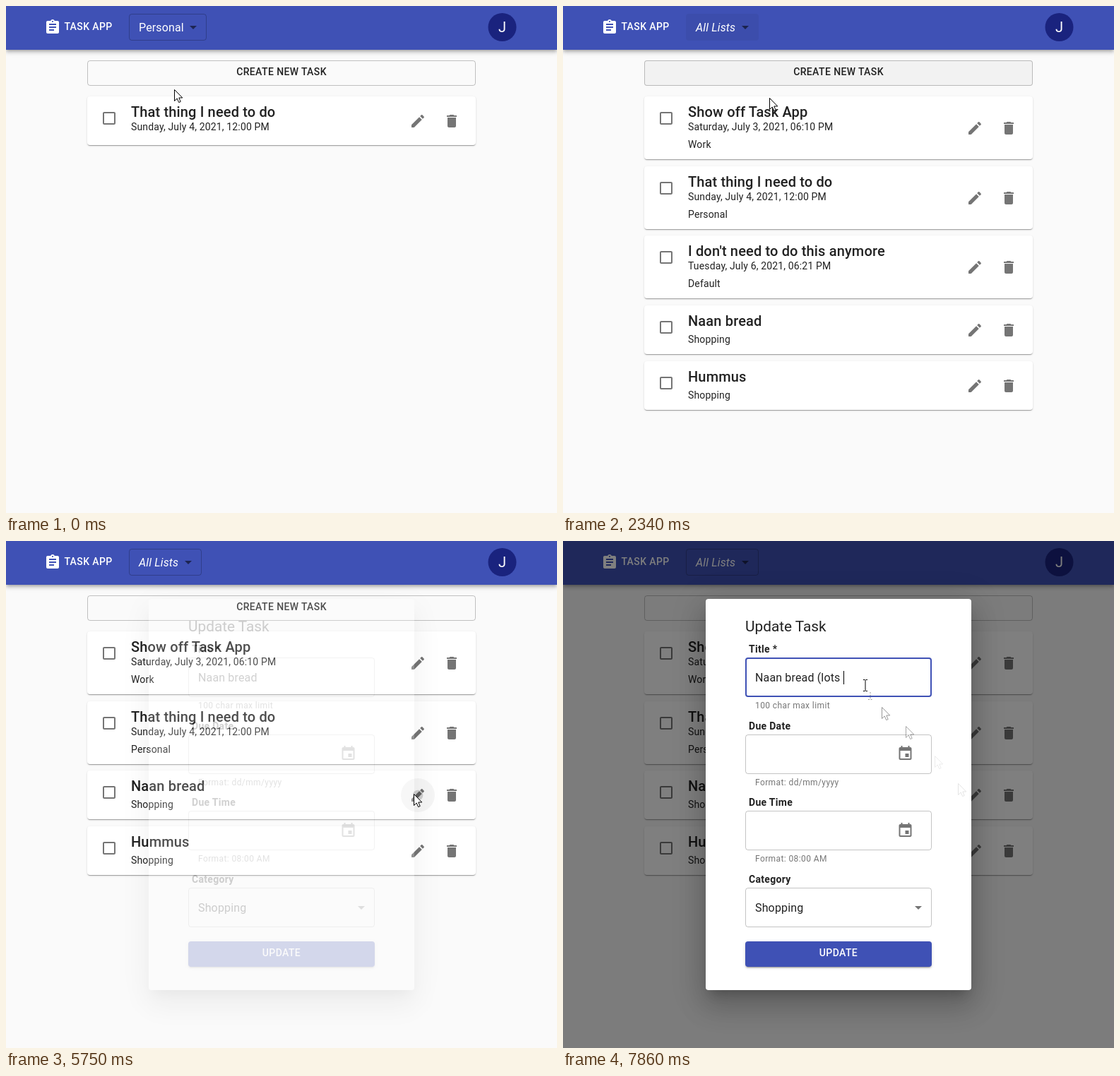
An HTML page for the animation above (8000 ms loop, 780x718 px).

```html
<!DOCTYPE html>
<html lang="en">
<head>
<meta charset="utf-8">
<title>Task list</title>
<style>
html, body { margin: 0; width: 100%; height: 100%; overflow: hidden; background: #fafafa; }
#stage { position: absolute; left: 0; top: 0; width: 780px; height: 718px; overflow: hidden; background: #fafafa; }
#stage div { position: absolute; box-sizing: border-box; }
svg { position: absolute; left: 0; top: 0; overflow: visible; }
#stage, text { font-family: Roboto, Arial, sans-serif; }
text { fill: rgba(0,0,0,.87); white-space: pre; }
.h6 { font-size: 20px; font-weight: 500; letter-spacing: .15px; }
.body1 { font-size: 16px; letter-spacing: .15px; }
.body2 { font-size: 14px; letter-spacing: .15px; }
.btn { font-size: 14px; font-weight: 500; letter-spacing: .4px; }
.label { font-size: 14px; font-weight: 700; letter-spacing: .3px; }
.help { font-size: 12px; letter-spacing: .4px; fill: rgba(0,0,0,.54); }
.head { font-size: 20.8px; }
.white { fill: #fff; }
.it { font-style: italic; }
.mid { text-anchor: middle; }
.icon { fill: rgba(0,0,0,.54); }
#bar { left: 0; top: 0; width: 780px; height: 62px; background: #3f51b5;
  box-shadow: 0 2px 4px -1px rgba(0,0,0,.2), 0 4px 5px rgba(0,0,0,.14), 0 1px 10px rgba(0,0,0,.12); }
#select { left: 174px; top: 11px; height: 38px; border: 1px solid; border-radius: 4px; }
#create { left: 115px; top: 77px; width: 550px; height: 36px; border: 1px solid rgba(0,0,0,.23); border-radius: 4px; }
.card { left: 115px; width: 550px; background: #fff; border-radius: 4px;
  box-shadow: 0 2px 1px -1px rgba(0,0,0,.2), 0 1px 1px rgba(0,0,0,.14), 0 1px 3px rgba(0,0,0,.12); }
#menu { left: 174px; top: 15px; width: 110px; height: 268px; background: #fff; border-radius: 4px; transform-origin: 0 0;
  box-shadow: 0 5px 5px -3px rgba(0,0,0,.2), 0 8px 10px 1px rgba(0,0,0,.14), 0 3px 14px 2px rgba(0,0,0,.12); }
#menu .item { left: 0; width: 110px; height: 36px; overflow: hidden; }
#shade { inset: 0; background: #000; }
#dialog { inset: 0; }
#paper { left: 202px; top: 82px; width: 376px; height: 554px; background: #fff; border-radius: 4px;
  box-shadow: 0 11px 15px -7px rgba(0,0,0,.2), 0 24px 38px 3px rgba(0,0,0,.14), 0 9px 46px 8px rgba(0,0,0,.12); }
.field { left: 258px; width: 264px; height: 56px; border: 1px solid rgba(0,0,0,.23); border-radius: 4px; }
#update { left: 258px; top: 567px; width: 264px; height: 36px; background: #3f51b5; border-radius: 4px;
  box-shadow: 0 3px 1px -2px rgba(0,0,0,.2), 0 2px 2px rgba(0,0,0,.14), 0 1px 5px rgba(0,0,0,.12); }
#value { left: 272px; top: 184px; font-size: 16px; line-height: 19px; letter-spacing: .15px; white-space: pre; color: rgba(0,0,0,.87); }
#caret { display: inline-block; width: 1px; height: 19px; background: #000; vertical-align: top; }
</style>
</head>
<body>
<div id="stage"></div>
<script>
const ICONS = {
  box: 'M19 5v14H5V5h14m0-2H5c-1.1 0-2 .9-2 2v14c0 1.1.9 2 2 2h14c1.1 0 2-.9 2-2V5c0-1.1-.9-2-2-2z',
  edit: 'M3 17.25V21h3.75L17.81 9.94l-3.75-3.75L3 17.25zM20.71 7.04c.39-.39.39-1.02 0-1.41l-2.34-2.34c-.39-.39-1.02-.39-1.41 0l-1.83 1.83 3.75 3.75 1.83-1.83z',
  bin: 'M6 19c0 1.1.9 2 2 2h8c1.1 0 2-.9 2-2V7H6v12zM19 4h-3.5l-1-1h-5l-1 1H5v2h14V4z',
  list: 'M19 3h-4.18C14.4 1.84 13.3 1 12 1c-1.3 0-2.4.84-2.82 2H5c-1.1 0-2 .9-2 2v14c0 1.1.9 2 2 2h14c1.1 0 2-.9 2-2V5c0-1.1-.9-2-2-2zm-7 0c.55 0 1 .45 1 1s-.45 1-1 1-1-.45-1-1 .45-1 1-1zm2 14H7v-2h7v2zm3-4H7v-2h10v2zm0-4H7V7h10v2z',
  day: 'M17 12h-5v5h5v-5zM16 1v2H8V1H6v2H5c-1.11 0-1.99.9-1.99 2L3 19c0 1.1.89 2 2 2h14c1.1 0 2-.9 2-2V5c0-1.1-.9-2-2-2h-1V1h-2zm3 18H5V8h14v11z',
  drop: 'M7 10l5 5 5-5z'
};
const POINTERS = {
  arrow: '<path d="M.5.5V16.5L4.2 13L6.7 18.6L9.2 17.5L6.8 12H11.8Z" fill="#fff" stroke="#000"/>',
  hand: '<g transform="translate(-6 0)" stroke="#000" fill="#fff"><path d="M6.5.5C5.5.5 5 1.3 5 2V12L3.2 10.4C2.2 9.6.8 10 .6 11C.4 11.6.8 12.2 1.2 12.8L5 18.5C5.4 19.2 5.5 20 5.5 22H14.5C14.5 19.5 16.5 17.5 16.5 14.5V9C16.5 7.5 14 7.3 14 8.8V8C14 6.6 11 6.4 11 8V7.3C11 6 8 5.8 8 7.3V2C8 1.2 7.5.5 6.5.5Z"/><path d="M8 7V11M11 8V11M14 9V11.5" fill="none"/></g>',
  beam: '<path d="M-3 -7.5H-.5M.5 -7.5H3M0 -7V8M-3 8.5H-.5M.5 8.5H3" fill="none" stroke="#000"/>'
};

const text = (x, y, cls, s) => `<text x="${x}" y="${y}" class="${cls}">${s}</text>`;
const icon = (cx, cy, name, cls = 'icon', id = '') =>
  `<path id="${id}" class="${cls}" transform="translate(${cx - 12} ${cy - 12})" d="${ICONS[name]}"/>`;
const svg = body => `<svg width="780" height="718">${body}</svg>`;
const ghost = (x, y, id) => `<g id="${id}" transform="translate(${x} ${y})">${POINTERS.arrow}</g>`;

const tasks = [
  { title: 'Show off Task App', date: 'Saturday, July 3, 2021, 06:10 PM', cat: 'Work' },
  { title: 'That thing I need to do', date: 'Sunday, July 4, 2021, 12:00 PM', cat: 'Personal' },
  { title: "I don't need to do this anymore", date: 'Tuesday, July 6, 2021, 06:21 PM', cat: 'Default' },
  { title: 'Naan bread', cat: 'Shopping' },
  { title: 'Hummus', cat: 'Shopping' }
];
const lists = ['All Lists', 'Default', 'Personal', 'Shopping', 'Wishlist', 'Work', 'Finished'];

const cardHtml = (k, i) => `<div class="card" id="card${i}">${svg(
  icon(31, 31, 'box') + text(62, 29, 'h6', k.title) +
  (k.date ? text(62, 48, 'body2', k.date) : '') +
  `<g id="cat${i}">${text(62, k.date ? 73 : 53, 'body2', k.cat)}</g>` +
  `<g id="acts${i}">${icon(468, 0, 'edit')}${icon(516, 0, 'bin')}</g>`)}</div>`;

const itemHtml = (s, i) => `<div class="item" style="top:${8 + 36 * i}px;background:rgba(0,0,0,${[.04, 0, .08][i] || 0})">${svg(
  (i ? '' : '<circle id="itemRipple" cx="54" cy="20"/>') +
  text(16, 24, 'body1' + (i % 6 ? '' : ' it'), s))}</div>`;

const fieldTops = [165, 274, 382, 491];
const labels = ['Title *', 'Due Date', 'Due Time', 'Category'];
const helps = ['100 char max limit', 'Format: dd/mm/yyyy', 'Format: 08:00 AM'];

document.getElementById('stage').innerHTML =
  `<div id="create"></div>${svg(text(390, 98, 'btn mid', 'CREATE NEW TASK'))}` +
  tasks.map(cardHtml).join('') +
  svg('<circle id="editHover" cx="583" r="24"/><circle id="binHover" cx="631" r="24"/><circle id="editRipple" cx="583"/><circle id="binRipple" cx="631"/>') +
  `<div id="bar"></div><div id="select"></div>` +
  svg(icon(66, 30, 'list', 'white') + text(82.5, 34, 'btn white', 'TASK APP') +
    text(188, 36, 'body1 white', '<tspan id="choice"></tspan>') + icon(0, 30, 'drop', 'icon', 'selectArrow') +
    '<circle cx="702.5" cy="30" r="20" fill="#1a237e"/>' +
    '<text x="702.5" y="37" class="mid white" font-size="20">J</text>') +
  `<div id="menu">${lists.map(itemHtml).join('')}</div>` +
  `<div id="shade"></div><div id="dialog"><div id="paper"></div>` +
  fieldTops.map((y, i) => `<div class="field" id="field${i}" style="top:${y}px"></div>`).join('') +
  '<div id="update"></div>' +
  svg(text(258, 128, 'head', 'Update Task') +
    labels.map((s, i) => text(263, fieldTops[i] - 7, 'label', s)).join('') +
    helps.map((s, i) => text(272, fieldTops[i] + 72, 'help', s)).join('') +
    icon(484.5, 301, 'day') + icon(484.5, 410, 'day') +
    text(272, 525, 'body1', 'Shopping') + icon(503, 519, 'drop') +
    text(390, 588, 'btn mid white', 'UPDATE')) +
  '<div id="value"><span id="typed"></span><span id="caret"></span></div></div>' +
  svg(ghost(559, 343, 'ghost0') + ghost(526, 304, 'ghost1') + ghost(485, 262, 'ghost2') + ghost(451, 235, 'ghost3') +
    '<path id="ghost4" d="M435 214V224M432 224.5H438" stroke="#000" stroke-dasharray="2 1.5"/>' +
    '<g id="pointer">' + Object.keys(POINTERS).map(k => `<g id="${k}">${POINTERS[k]}</g>`).join('') + '</g>');

const el = {};
document.querySelectorAll('[id]').forEach(e => { if (e.id) el[e.id] = e; });

// Time of each step, then its value
const path = [
  [30, 238, 118], [380, 230, 34], [940, 230, 34], [1140, 228, 40], [2080, 228, 40], [2840, 461, 370],
  [2900, 461, 370], [3240, 605, 378], [3500, 630, 376], [3650, 630, 376], [3680, 631, 374],
  [4420, 631, 374], [4580, 602, 361], [4750, 572, 359], [4850, 572, 359], [4880, 569, 358],
  [5060, 569, 358], [5120, 578, 359], [5700, 578, 359], [5860, 575, 357], [5950, 575, 357],
  [5980, 559, 343], [6015, 526, 304], [6050, 485, 262], [6080, 451, 235], [6110, 435, 216],
  [6140, 435, 216], [6210, 428, 204]
];
const shapes = [[0, 'arrow'], [82, 'hand'], [202, 'arrow'], [280, 'hand'], [2150, 'arrow'], [2237, 'hand'],
  [2308, 'arrow'], [3120, 'hand'], [5700, 'arrow'], [6105, 'beam']];
const typing = [[0, ''], [6840, ' '], [7140, ' ('], [7420, ' (l'], [7530, ' (lo'], [7640, ' (lot'], [7750, ' (lots'], [7860, ' (lots ']];
const ghosts = [[6010, .1], [6040, .07], [6075, .34], [6105, .4], [6150, .4]];

const LOOP = 8000, SHOW_ALL = 1560, REMOVED = 4445;
const at = (steps, t) => steps.filter(s => s[0] <= t).pop()[1];
const clamp = x => Math.min(1, Math.max(0, x));

// cubic-bezier(.4, 0, .2, 1)
function ease(x) {
  let lo = 0, hi = 1;
  for (let i = 0; i < 16; i++) {
    const u = (lo + hi) / 2, v = 1 - u;
    if (1.2 * v * v * u + .6 * v * u * u + u * u * u < x) lo = u; else hi = u;
  }
  return lo * lo * (3 - 2 * lo);
}
const ramp = (t, start, dur) => ease(clamp((t - start) / dur));
const hover = (t, ...spans) => Math.max(...spans.map(([a, b]) => ramp(t, a, 150) * (1 - ramp(t, b, 150))));

function pointerAt(t) {
  if (t <= path[0][0]) return path[0].slice(1);
  for (let i = 1; i < path.length; i++) {
    const [a, ax, ay] = path[i - 1], [b, bx, by] = path[i];
    if (t < b) {
      let k = (t - a) / (b - a);
      if (b - a > 345) k = k * k * (3 - 2 * k);
      return [ax + (bx - ax) * k, ay + (by - ay) * k];
    }
  }
  return path[path.length - 1].slice(1);
}

function ripple(node, t, start, end, size, alpha) {
  node.setAttribute('r', size * ramp(t, start, 420));
  node.style.opacity = t < start ? 0 : alpha * (1 - ramp(t, end, 250));
}

function drawCards(t) {
  const all = t >= SHOW_ALL;
  let y = 128.2;
  tasks.forEach((k, i) => {
    const gone = i === 2 && t >= REMOVED;
    const shown = i === 1 || (all && !gone);
    const h = k.date && all ? 89 : 69;
    const card = el['card' + i];
    card.style.display = shown ? 'block' : 'none';
    if (!shown) return;
    card.style.top = Math.round(y) + 'px';
    card.style.height = h + 'px';
    card.style.opacity = i === 1 ? 1 : ramp(t, SHOW_ALL, 225) * (i === 2 ? 1 - ramp(t, 4250, 195) : 1);
    el['cat' + i].style.display = all ? '' : 'none';
    el['acts' + i].setAttribute('transform', `translate(0 ${h / 2 + .5})`);
    y += h + 9.6;
  });
}

function drawSelect(t) {
  const allLists = t >= 1515, width = allLists ? 103 : 110;
  const focus = t >= 640 && t < 4060;
  el.choice.textContent = allLists ? 'All Lists' : 'Personal';
  el.choice.setAttribute('class', allLists ? 'it' : '');
  el.select.style.width = width + 'px';
  el.select.style.background = focus ? 'rgba(0,0,0,.05)' : 'none';
  el.select.style.borderColor = focus ? 'transparent' : t >= 280 && t < 640 ? 'rgba(0,0,0,.87)' : 'rgba(0,0,0,.23)';
  el.selectArrow.setAttribute('transform', `translate(${174 + width - 31} 18)`);
}

function drawMenu(t) {
  const grow = ramp(t, 660, 255) - ramp(t, 1600, 170);
  el.menu.style.opacity = ramp(t, 660, 255) * (1 - ramp(t, 1515, 255));
  el.menu.style.transform = `scale(${.75 + .25 * grow}, ${.5625 + .4375 * grow})`;
  ripple(el.itemRipple, t, 1420, 1700, 50, .24);
}

function drawDialog(t) {
  el.shade.style.opacity = .5 * ramp(t, 5787, 225);
  el.dialog.style.opacity = ramp(t, 5698, 225);
  const focus = t >= 6380;
  el.field0.style.border = focus ? '2px solid #3f51b5' : `1px solid rgba(0,0,0,${t >= 6105 ? .87 : .23})`;
  el.typed.textContent = 'Naan bread' + at(typing, t);
  el.caret.style.visibility = focus ? 'visible' : 'hidden';
}

function draw(t) {
  drawCards(t);
  drawSelect(t);
  drawMenu(t);
  drawDialog(t);
  el.create.style.background = `rgba(0,0,0,${.04 * hover(t, [82, 202], [2237, 2308])})`;
  const row = t < REMOVED ? 370 : 360;
  for (const id of ['editHover', 'binHover', 'editRipple', 'binRipple']) el[id].setAttribute('cy', row);
  el.editHover.style.opacity = .04 * hover(t, [3090, 3260], [4580, 5950]);
  el.binHover.style.opacity = .04 * hover(t, [3260, 4560]);
  ripple(el.binRipple, t, 4030, 4200, 24, .16);
  ripple(el.editRipple, t, 5630, 5860, 22, .16);
  ghosts.forEach(([start, alpha], i) => { el['ghost' + i].style.opacity = t >= start ? alpha : 0; });
  const [x, y] = pointerAt(t), shape = at(shapes, t);
  el.pointer.setAttribute('transform', `translate(${Math.round(x)} ${Math.round(y)})`);
  for (const k in POINTERS) el[k].style.display = k === shape ? '' : 'none';
}

const begin = performance.now();
function tick() {
  draw((performance.now() - begin) % LOOP);
  requestAnimationFrame(tick);
}
tick();
</script>
</body>
</html>
```
